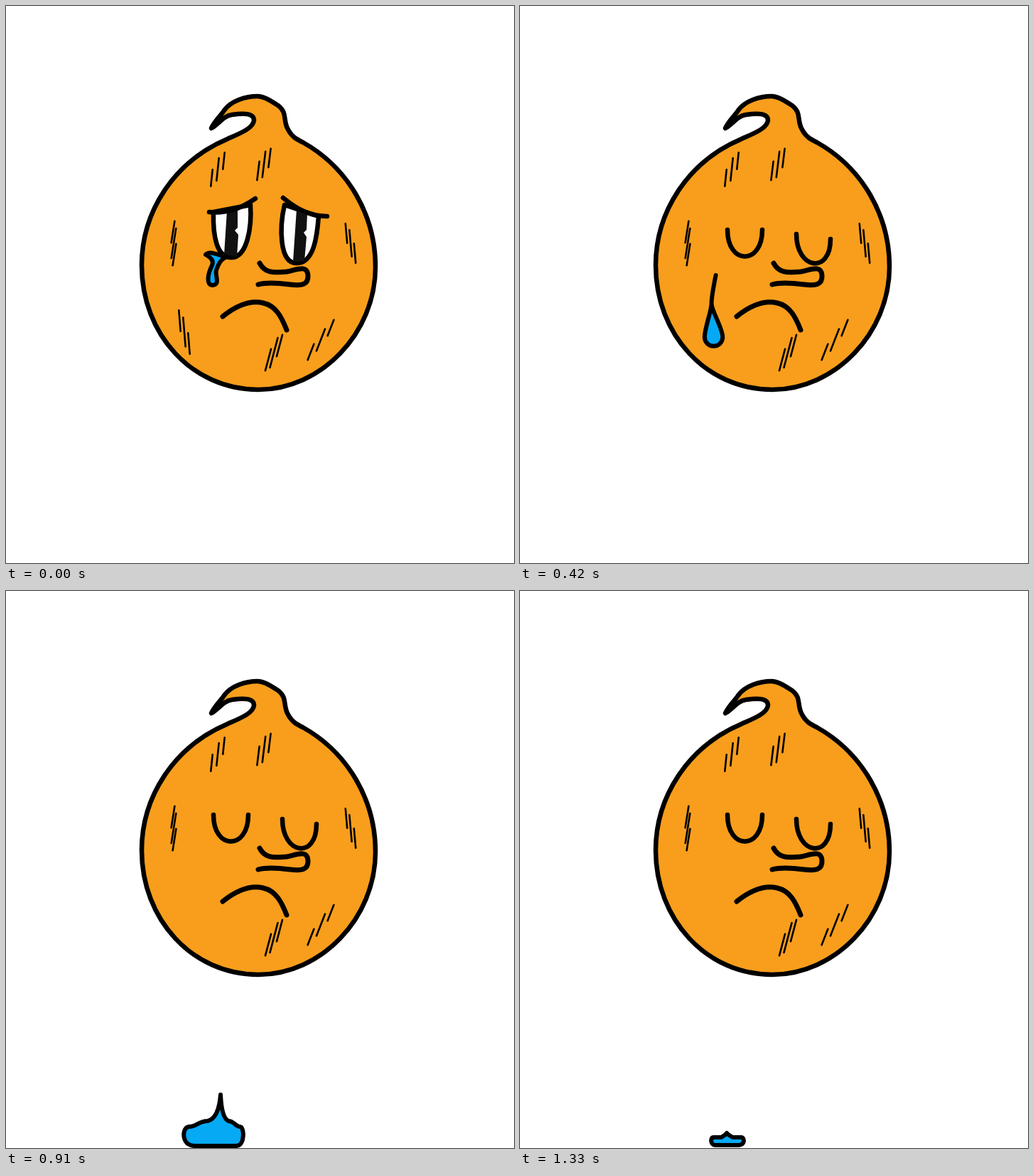
These frames come from a looping animation (715x784 px, 1400 ms). An HTML page:

```html
<!DOCTYPE html>
<html lang="en">
<head>
<meta charset="utf-8">
<title>Crying onion</title>
<style>
  html, body { margin: 0; width: 100%; height: 100%; overflow: hidden; background: #fff; }
  svg { display: block; width: 715px; height: 784px; }
  .water { fill: #05a9f4; stroke-width: 6; }
</style>
</head>
<body>
<svg viewBox="0 0 715 784" fill="none" stroke="#000" stroke-width="6.5" stroke-linecap="round" stroke-linejoin="round">
  <path fill="#f89e1c" d="M289 172C295 160 302 155 307 147C317 133 338 127 354 127C364 127 375 135 383 140C396 150 390 160 396 172C402 184 408 187 418 192C482 228 520 295 520 367C520 461 443 540 355 540C262 540 191 462 191 365C191 290 236 219 312 187C330 179 348 172 349 161C349 150 333 151 318 153C305 155 300 166 289 172Z"/>
  <path stroke-width="7" d="M357 362C364 375 374 376 395 374C410 371 424 364 425 379C426 393 415 394 400 392C385 390 365 389 355 392M305 437C325 421 345 414 362 418C380 422 388 438 395 456"/>
  <path id="peel" stroke-width="2.6"/>
  <path id="cheek" stroke-width="2.6"/>
  <g id="eyeL">
    <path fill="#fff" d="M292 290C291 325 297 354 317 354C340 354 346 310 344 280Z"/>
    <path fill="#111" stroke="none" d="M311 288L326 286 326 312 322 316 327 322 325 353 307 350Z"/>
  </g>
  <g id="eyeR">
    <path fill="#fff" d="M392 280C385 310 384 362 409 362C434 362 438 322 440 296Z"/>
    <path fill="#111" stroke="none" d="M409 286L424 292 423 315 419 319 423 325 420 359 404 360Z"/>
  </g>
  <path id="lidL"/>
  <path id="lidR"/>
  <path id="tear" class="water"/>
  <path id="puddle" class="water"/>
  <path id="splashL" class="water" d="M198 722C193 711 185 697 171 696C159 695 153 705 160 712C169 721 186 716 198 722Z"/>
  <path id="splashR" class="water" d="M431 743C440 735 455 731 466 735C469 740 469 748 463 748C452 748 449 741 431 743Z"/>
</svg>
<script>
const STEP = 70, COUNT = 20;
const el = id => document.getElementById(id);
const path = (id, d) => el(id).setAttribute('d', d);
const show = (id, visible) => el(id).style.display = visible ? '' : 'none';
const clamp = t => Math.max(0, Math.min(1, t));
const mix = (a, b, t) => a.map((v, i) => v + (b[i] - v) * t);

// Lid ends: open, shut, resting
const LID_L = [[286, 290, 351, 271], [284, 318, 346, 315], [292, 315, 341, 315]];
const LID_R = [[390, 270, 452, 296], [381, 321, 444, 336], [389, 321, 437, 328]];
// Sag, inset of the curve's handles
const LID_BEND = [[9, 0.35], [5, 0.35], [50, 0]];

// Puddle: centre, tip, left, right, dip, lobe, bottom
const SPLAT = [302, 709, 250, 334, 746, 754, 781];
const SPREAD = [296, 735, 219, 378, 754, 740, 775];
const REST = [291, 763, 269, 315, 769, 769, 780];

const WELLING = 'M281 350C286 344 297 350 310 353C302 357 299 363 296 372C294 380 302 392 291 393C281 393 284 377 290 365C293 358 288 354 281 350Z';

// Three parallel strokes, the middle one longest.
function hatch(x, y, stepX, stepY, lean, length) {
  return [-1, 0, 1].map(i => {
    const k = i ? 0.4 : 0.55, dx = lean * k, dy = length * k;
    return `M${x + i * stepX - dx} ${y + i * stepY - dy}l${2 * dx} ${2 * dy}`;
  }).join('');
}

function pose(poses, n) {
  const [open, shut, rest] = poses;
  return mix(mix(open, shut, clamp(n / 4)), rest, clamp((n - 4) / 2));
}

function lid(ends, n) {
  const [x1, y1, x2, y2] = pose(ends, n), [sag, inset] = pose(LID_BEND, n);
  const dx = (x2 - x1) * inset, dy = (y2 - y1) * inset;
  return `M${x1} ${y1}C${x1 + dx} ${y1 + dy + sag} ${x2 - dx} ${y2 - dy + sag} ${x2} ${y2}`;
}

// Squash an eye towards its falling lid.
function squash(id, n, top, fall) {
  const k = 1 - n / 4;
  show(id, n < 4);
  el(id).setAttribute('transform', `translate(0 ${top + fall * (1 - k) - top * k}) scale(1 ${k})`);
}

// Slow roll down the cheek, then a steady fall with a gentle sway.
function drop(n) {
  const bottom = 390 + 8.2 * n + 39.6 * Math.max(0, n - 5);
  const x = 270 + 19 * (1 - Math.cos((n - 5) * Math.PI / 6));
  const length = Math.min(102, 35 + 1.8 * n * n);
  const lean = 3 + 2.5 * Math.abs(n - 6);
  const r = 10 + 0.45 * n, y = bottom - r;
  const tip = bottom - length, neckX = x + lean - 6, neckY = tip + 0.4 * length;
  return `M${x + lean} ${tip}Q${neckX} ${neckY - 10} ${neckX} ${neckY}` +
    `C${neckX} ${neckY + 10} ${x - r} ${y - r} ${x - r} ${y}A${r} ${r} 0 0 0 ${x + r} ${y}` +
    `C${x + r} ${y - r} ${neckX} ${neckY + 10} ${neckX} ${neckY}`;
}

function puddle(n) {
  const spread = mix(SPLAT, SPREAD, clamp((n - 13) / 4));
  const [x, tip, left, right, dip, lobe, bottom] = mix(spread, REST, clamp((n - 17) / 2));
  const half = edge => {
    const at = k => x + (edge - x) * k;
    return `M${x} ${tip}Q${at(0.05)} ${dip - 4} ${at(0.35)} ${dip}` +
      `C${at(0.6)} ${dip} ${at(0.65)} ${lobe} ${at(0.85)} ${lobe}` +
      `C${at(1.05)} ${lobe} ${at(1.08)} ${bottom} ${at(0.7)} ${bottom}L${x} ${bottom}`;
  };
  return half(left) + half(right);
}

function splash(id, n, dx, dy) {
  const t = n - 17;
  show(id, Math.abs(t) < 2);
  el(id).setAttribute('transform', `translate(${t * dx} ${Math.abs(t) * dy})`);
}

function draw(n) {
  squash('eyeL', n, 282, 35);
  squash('eyeR', n, 285, 44);
  path('lidL', lid(LID_L, n));
  path('lidR', lid(LID_R, n));
  show('cheek', n < 5);
  show('tear', n < 13);
  path('tear', n ? drop(n) : WELLING);
  show('puddle', n >= 13);
  path('puddle', puddle(n));
  splash('splashL', n, -72, 18);
  splash('splashR', n, 74, 8);
}

function tick() {
  draw(Math.floor(performance.now() / STEP) % COUNT);
  requestAnimationFrame(tick);
}

path('peel',
  hatch(298, 230, 8.5, -12, -3, 29) + hatch(363, 223, 8, -9, -4, 33) +
  hatch(236, 334, 1, 16, -6, 38) + hatch(485, 334, 6, 14, 3, 34) +
  hatch(377, 488, 8, -10, -10, 38) + hatch(443, 470, 14, -17, -11, 28));
path('cheek', hatch(251, 459, 6.5, 16, 3, 37));
tick();
</script>
</body>
</html>
```
